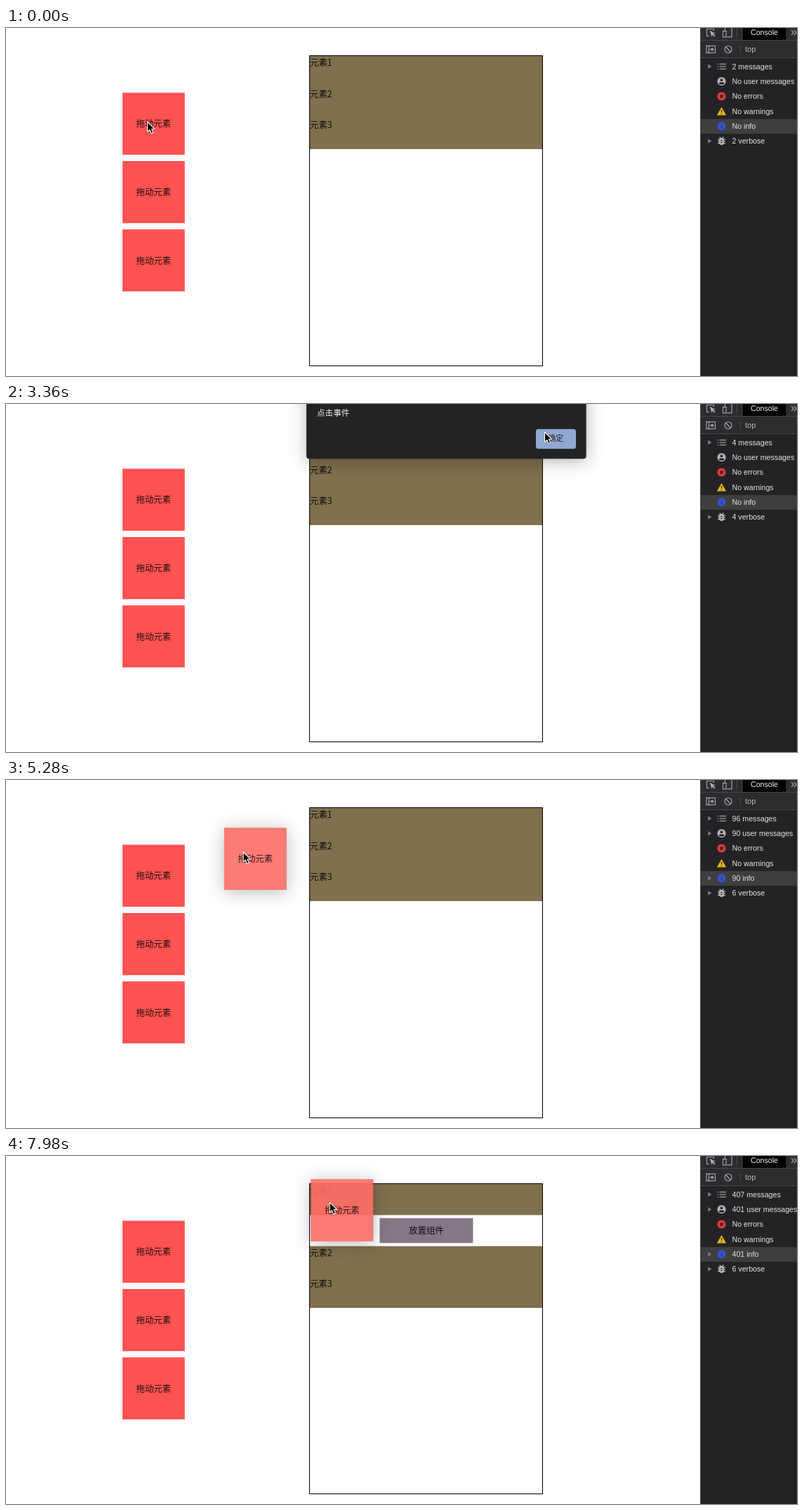
Recreate the animation shown at these times as an HTML page with a canvas. Size 1127x497 px, loop 8000 ms.

```html
<!DOCTYPE html>
<html lang="zh-CN">
<head>
<meta charset="utf-8">
<title>拖动元素</title>
<style>
html, body { margin: 0; width: 100%; height: 100%; overflow: hidden; background: #fff; }
canvas { display: block; }
</style>
</head>
<body>
<canvas id="stage" width="1127" height="497"></canvas>
<script>
const ctx = document.getElementById('stage').getContext('2d');
const W = 1127, H = 497, LOOP = 8000, STEP = 60;
const CJK = '"Noto Sans CJK SC", "Noto Sans CJK", sans-serif';
const UI = '"Liberation Sans", Arial, sans-serif';
const SIZE = 12.42, UI_SIZE = 10.65;
const TILE = 88.7, ROW = TILE / 2;
const GREY = '#a4a5a8', LIGHT = '#b5b6ba', PANEL = '#232326', RULE = '#47474a';
const ARROW = new Path2D('M0 0V14.2L3.2 11.3 5.6 16.8 8.3 15.6 5.9 10.3 10.3 10.1Z');

// Pointer moves: start, end, destination
const HOME = [201.5, 134], OK = [767.5, 40];
const moves = [
  [720, 1380, OK], [1560, 2160, [532.5, 124]], [2820, 3300, OK],
  [3480, 4140, [110, 118]], [4140, 4380, [205, 126]], [4380, 5280, [338, 103]],
  [5280, 5880, [450, 98]], [5880, 6900, [424, 88]], [6900, 8460, [472, 60]]
];
const dialogs = [[660, 1620], [2520, 3480]];
const DRAG = 4370, PLACE = 5760, LAG = 100;
const infoKeys = [[4440, 0], [5280, 90], [6900, 254], [7980, 401]];

const clamp = k => Math.max(0, Math.min(1, k));
const smooth = k => k * k * (3 - 2 * k);
const mix = (a, b, k) => a + (b - a) * k;

function pointerAt(t) {
  return moves.reduce((at, [start, end, to]) => {
    const k = smooth(clamp((t - start) / (end - start)));
    return at.map((v, i) => mix(v, to[i], k));
  }, HOME);
}

function infoAt(t) {
  let n = 0;
  for (let i = 1; i < infoKeys.length; i++) {
    const [t0, n0] = infoKeys[i - 1], [t1, n1] = infoKeys[i];
    n += (n1 - n0) * clamp((t - t0) / (t1 - t0));
  }
  return Math.round(n);
}

function rect(x, y, w, h, color) {
  ctx.fillStyle = color;
  ctx.fillRect(x, y, w, h);
}

function rounded(x, y, w, h, r, color) {
  ctx.beginPath();
  ctx.roundRect(x, y, w, h, r);
  ctx.fillStyle = color;
  ctx.fill();
}

function frame(x, y, w, h, color, width = 1.2) {
  ctx.strokeStyle = color;
  ctx.lineWidth = width;
  ctx.strokeRect(x, y, w, h);
}

function line(color, width, ...points) {
  ctx.beginPath();
  for (const p of points) ctx.lineTo(...p);
  ctx.strokeStyle = color;
  ctx.lineWidth = width;
  ctx.stroke();
}

function disc(x, y, r, color) {
  ctx.beginPath();
  ctx.arc(x, y, r, 0, Math.PI * 2);
  ctx.fillStyle = color;
  ctx.fill();
}

// Triangle with its tip at (x, y), pointing along (dx, dy)
function triangle(x, y, dx, dy, half, color) {
  const len = Math.hypot(dx, dy), nx = -dy / len * half, ny = dx / len * half;
  ctx.beginPath();
  ctx.moveTo(x, y);
  ctx.lineTo(x - dx + nx, y - dy + ny);
  ctx.lineTo(x - dx - nx, y - dy - ny);
  ctx.fillStyle = color;
  ctx.fill();
}

function text(s, x, y, size, color, font = CJK, align = 'left') {
  ctx.font = size + 'px ' + font;
  ctx.textAlign = align;
  ctx.fillStyle = color;
  ctx.fillText(s, x, y);
}

function shadow(alpha, blur, dy) {
  ctx.shadowColor = `rgba(0,0,0,${alpha})`;
  ctx.shadowBlur = blur;
  ctx.shadowOffsetY = dy;
}

function tile(x, y, color = '#ff5252') {
  rect(x, y, TILE, TILE, color);
  text('拖动元素', x + ROW, y + 49, SIZE, '#1c0c0c', CJK, 'center');
}

// The shadow stays outside the translucent tile
function dragged(x, y, alpha) {
  ctx.save();
  ctx.globalAlpha = alpha;
  ctx.save();
  ctx.beginPath();
  ctx.rect(0, 0, W, H);
  ctx.rect(x, y, TILE, TILE);
  ctx.clip('evenodd');
  shadow(0.3, 24, 3);
  rect(x, y, TILE, TILE, '#000');
  ctx.restore();
  tile(x, y, '#ff6d66');
  ctx.restore();
}

function list(placed) {
  const top = 40, gap = placed ? ROW : 0;
  rect(433, top, 331, Math.round(ROW * 3 + gap), '#80704e');
  for (let i = 0; i < 3; i++) {
    text('元素' + (i + 1), 433, top + 14.4 + i * ROW + (i && gap), SIZE, '#0d0b08');
  }
  if (placed) {
    const y = top + ROW;
    rect(433, y, 331, ROW, '#fff');
    rect(532.4, y + 4.4, TILE * 1.5, 35.5, '#857886');
    text('放置组件', 598.9, y + 26.8, SIZE, '#0d0c0d', CJK, 'center');
  }
  frame(432.5, 39.5, 332, 443, '#000', 1);
}

function dialog() {
  ctx.save();
  shadow(0.3, 24, 4);
  rounded(428, -60, 398.7, 138.3, 4, PANEL);
  ctx.restore();
  text('点击事件', 443, 17.2, 11.6, '#f0f0f0');
  rounded(755, 35.7, 57, 28.3, 3.5, '#91a8d2');
  text('确定', 783.2, 53.4, 11, '#202228', CJK, 'center');
}

function toolbar() {
  rect(989, 0, 138, 42, '#2c2c2f');
  rect(1050, 0, 61, 17, '#000');
  for (const y of [17, 42]) rect(989, y, 138, 1, RULE);
  rect(1041, 0, 1, 13, RULE);
  rect(1046, 24, 1, 13, RULE);
  text('Console', 1080.5, 10, UI_SIZE, '#f2f2f2', UI, 'center');
  text('top', 1053, 34, 11.2, '#b9babd', UI);

  // Element picker, device switch, overflow
  line(GREY, 1.2, [1008.5, 4], [1008.5, 1.5], [998.5, 1.5], [998.5, 11.5], [1002, 11.5]);
  ctx.save();
  ctx.translate(1002.5, 3.5);
  ctx.rotate(-0.3);
  ctx.scale(0.65, 0.65);
  ctx.fillStyle = GREY;
  ctx.fill(ARROW);
  ctx.restore();
  frame(1024.5, -2, 9.5, 14.8, GREY);
  rect(1021, 4, 6, 10, '#2c2c2f');
  frame(1021.5, 4.5, 4.5, 8.5, GREY);
  for (const x of [1119, 1123]) line(GREY, 1.2, [x, 3], [x + 3, 6.5], [x, 10]);

  // Sidebar and clear buttons
  frame(998, 25.5, 12.5, 10, GREY);
  line(GREY, 1.2, [1001.5, 25.5], [1001.5, 35.5]);
  line(GREY, 1.2, [1006, 30.5], [1009, 30.5]);
  triangle(1003, 30.5, -4, 0, 2.7, GREY);
  ctx.beginPath();
  ctx.arc(1029, 30.5, 5, 0, Math.PI * 2);
  ctx.stroke();
  line(GREY, 1.3, [1025.5, 27], [1032.5, 34]);
}

// Icons are drawn around their own centre
const icons = {
  messages() {
    for (const y of [-3.5, 0, 3.5]) {
      rect(-6, y - 0.6, 1.5, 1.2, GREY);
      rect(-3, y - 0.6, 9.5, 1.2, GREY);
    }
  },
  'user messages'() {
    disc(0, 0, 6, LIGHT);
    disc(0, -2, 1.9, PANEL);
    rounded(-3.7, 1.3, 7.4, 3, 1.5, PANEL);
  },
  errors() {
    disc(0, 0, 6, '#e8383d');
    for (const d of [-2.3, 2.3]) line(PANEL, 1.4, [-2.3, d], [2.3, -d]);
  },
  warnings() {
    triangle(0, -6, 0, -11.5, 6.5, '#f4bd0c');
    rect(-0.7, -2, 1.4, 3.8, PANEL);
    rect(-0.7, 2.8, 1.4, 1.4, PANEL);
  },
  info() {
    disc(0, 0, 6, '#3554c6');
    rect(-0.6, -3, 1.2, 1.3, '#26315f');
    rect(-0.6, -0.7, 1.2, 3.8, '#26315f');
  },
  verbose() {
    for (const y of [-2.5, 0.3, 3.1]) line(LIGHT, 1.3, [-5.3, y], [5.3, y]);
    for (const s of [-1, 1]) line(LIGHT, 1.3, [s * 2.8, -5.8], [s, -4]);
    rounded(-3.4, -4.5, 6.8, 10, 3.2, LIGHT);
    for (const y of [-0.8, 1.9]) line(PANEL, 1.1, [-1.4, y], [1.4, y]);
  }
};

function panel(info, verbose) {
  rect(989, 0, 138, H, PANEL);
  toolbar();
  rect(989, 130, 138, 21, '#3e3e41');
  rect(989, 0, 1, H, RULE);
  const counts = { messages: info + verbose, 'user messages': info, info, verbose };
  Object.keys(icons).forEach((name, i) => {
    const y = 55 + i * 21.3, n = counts[name];
    if (n) triangle(1005.3, y, 5, 0, 3.2, '#7e7f82');
    ctx.save();
    ctx.translate(1019.5, y);
    icons[name]();
    ctx.restore();
    text(`${n || 'No'} ${name}`, 1034.5, y + 3.8, UI_SIZE, '#e4e4e6', UI);
  });
}

function pointer(x, y) {
  ctx.save();
  ctx.translate(x, y);
  ctx.lineJoin = 'round';
  ctx.lineWidth = 1.1;
  ctx.fillStyle = '#000';
  ctx.strokeStyle = '#fff';
  shadow(0.35, 2, 1);
  ctx.fill(ARROW);
  shadow(0, 0, 0);
  ctx.stroke(ARROW);
  ctx.restore();
}

function draw(t) {
  rect(0, 0, W, H, '#fff');
  for (let i = 0; i < 3; i++) tile(166, 92.4 + i * TILE * 1.1);
  list(t >= PLACE);

  const alpha = 0.9 * clamp((t - DRAG) / 130);
  if (alpha) {
    const [x, y] = pointerAt(t - LAG);
    dragged(x - 22.5, y - 35.5, alpha);
  }

  if (dialogs.some(([open, close]) => t >= open && t < close)) dialog();
  const closed = dialogs.filter(([, close]) => t >= close).length;
  panel(infoAt(t), 2 + 2 * closed);
  pointer(...pointerAt(t));
}

const start = performance.now();
function tick() {
  const t = (performance.now() - start) % LOOP;
  draw(Math.floor(t / STEP) * STEP);
  requestAnimationFrame(tick);
}
tick();
</script>
</body>
</html>
```
